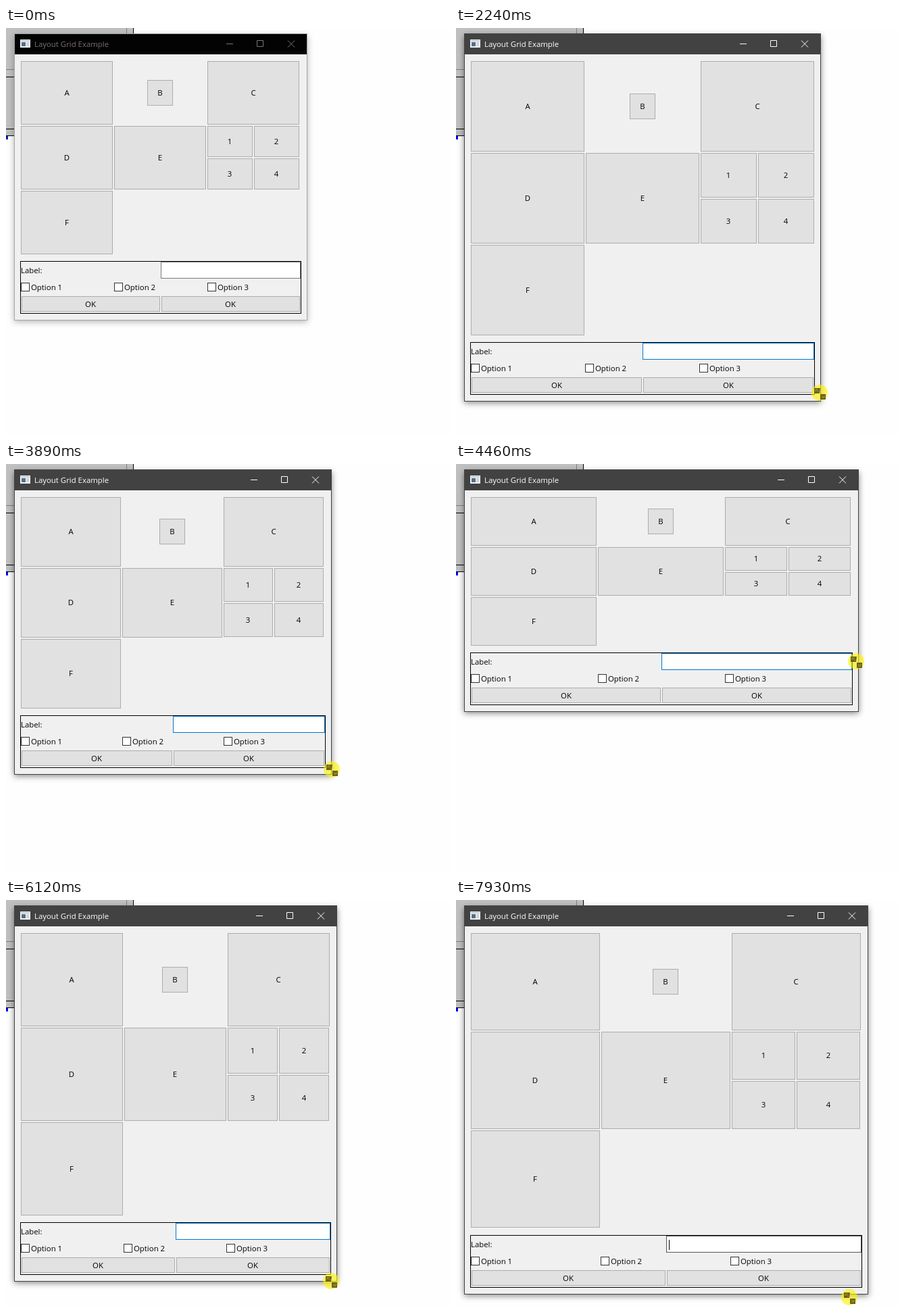
Animation, 657 px wide and 604 px high, one loop 8000 ms. Source, as an HTML page:

```html
<!DOCTYPE html>
<html lang="en">
<head>
<meta charset="utf-8">
<title>Layout Grid Example</title>
<style>
html, body { margin: 0; width: 100%; height: 100%; overflow: hidden; background: #fefefe; }
svg { display: block; width: 657px; height: 604px; }
rect { shape-rendering: crispEdges; }
text { font: 11.4px "Open Sans", "Noto Sans", sans-serif; fill: #000; }
</style>
</head>
<body>
<svg id="stage" viewBox="0 0 657 604">
  <defs>
    <filter id="blur" filterUnits="userSpaceOnUse" x="-40" y="-40" width="760" height="720">
      <feGaussianBlur stdDeviation="5"/>
    </filter>
  </defs>
</svg>
<script>
const NS = 'http://www.w3.org/2000/svg';
const LOOP = 8000, STEP = 70, ACTIVE = 1200;
const stage = document.getElementById('stage');

// Bursts of movement: start time and number of further steps.
const bursts = [[300, 9], [1200, 11], [2030, 11], [2860, 4], [3340, 11],
  [4180, 11], [5020, 10], [5840, 11], [6680, 11], [7510, 6]];

// Turns of the dragging pointer: time, x, y.
const path = [
  [1130, 446, 433], [1620, 605, 458], [1960, 570, 524], [2170, 540, 553],
  [2240, 538, 540], [2400, 552, 480], [2570, 605, 478], [3070, 647, 574], [3270, 647, 574],
  [3450, 625, 592], [3620, 520, 550], [3800, 480, 450], [4130, 590, 540],
  [4390, 596, 367], [4460, 592, 292], [4580, 572, 275], [4760, 525, 330], [5160, 615, 584],
  [5400, 540, 520], [5580, 510, 430], [5810, 612, 490], [6050, 490, 565], [6120, 481, 564],
  [6300, 445, 490], [6500, 470, 415], [6920, 548, 465], [7100, 556, 524], [7170, 559, 536],
  [7320, 540, 567], [7460, 490, 545], [7600, 530, 460], [7770, 645, 505],
  [7860, 610, 584], [7930, 582, 588]
];

// Flat at turning points, so no curve overshoots its nodes.
function slope(i, k) {
  const a = path[i - 1], p = path[i], b = path[i + 1];
  if (!a || !b || (p[k] - a[k]) * (b[k] - p[k]) <= 0) return 0;
  return (b[k] - a[k]) / (b[0] - a[0]);
}

function pointAt(t) {
  if (t < path[0][0]) {
    const u = Math.max(0, (t - 300) / 620);
    return [Math.round(408 + 39 * u + 130 * u * (1 - u)), Math.round(540 - 102 * u)];
  }
  let i = 0;
  while (i < path.length - 2 && t >= path[i + 1][0]) i++;
  const a = path[i], b = path[i + 1], d = b[0] - a[0];
  const u = Math.min(1, (t - a[0]) / d), v = 1 - u;
  return [1, 2].map(k => Math.round(
    a[k] * v * v * (1 + 2 * u) + b[k] * u * u * (3 - 2 * u) +
    d * u * v * (slope(i, k) * v - slope(i + 1, k) * u)));
}

function snap(t) {
  let q = 0;
  for (const [start, n] of bursts)
    if (t >= start) q = start + STEP * Math.min(n, Math.floor((t - start) / STEP));
  return q;
}

function set(el, attrs) {
  for (const k in attrs) el.setAttribute(k, attrs[k]);
}
function add(name, attrs = {}, parent = stage) {
  const el = document.createElementNS(NS, name);
  set(el, attrs);
  parent.appendChild(el);
  return el;
}
const fill = (x, y, width, height, color) => add('rect', { x, y, width, height, fill: color });
const framed = (color, stroke) => add('rect', { fill: color, stroke });
const button = () => framed('#e1e1e1', '#adadad');
// A one pixel border drawn inside the given bounds.
const place = (el, x, y, w, h) =>
  set(el, { x: x + .5, y: y + .5, width: Math.max(0, w - 1), height: Math.max(0, h - 1) });
function label(str, anchor = 'start') {
  const el = add('text', { 'text-anchor': anchor });
  el.textContent = str;
  return el;
}

// Desktop behind the window
fill(0, 0, 189, 8, '#c0c0c0');
fill(178, 0, 1, 8, '#808080');
fill(188, 0, 1, 9, '#000');
fill(0, 0, 13, 160, '#c0c0c0');
fill(0, 61, 13, 1, '#808080');
for (const y of [72, 149, 159]) fill(0, y, 13, 1, '#000');
const spot = fill(0, 160, 3, 5, '#00f');

// Window
const shadow = add('rect', { x: 12, y: 12, filter: 'url(#blur)' });
const border = fill(12, 8, 0, 0);
const bar = fill(13, 9, 0, 30);
const body = fill(13, 39, 0, 0, '#f0f0f0');
fill(21, 17, 15, 12, '#f4f4f4');
fill(22, 18, 13, 2, '#c3cbd2');
fill(23, 21, 6, 6, '#526f8c');
fill(30, 21, 4, 6, '#cfd4d8');
const title = label('Layout Grid Example');
set(title, { x: 42, y: 28 });
const controls = add('path', { fill: 'none' });

// Button grid
const cells = [...'ABCDEF1234'].map(s => ({ box: button(), text: label(s, 'middle') }));
function putCell(cell, x, y, w, h) {
  place(cell.box, x, y, w, h);
  set(cell.text, { x: x + Math.floor(w / 2), y: y + Math.floor(h / 2) + 4 });
}

// Form
const panel = framed('none', '#000');
const field = framed('#fff', '#7a7a7a');
const caret = fill(0, 0, 1, 15, '#000');
const caption = label('Label:');
const options = [1, 2, 3].map(n => ({ box: framed('#fff', '#333'), text: label('Option ' + n) }));
const oks = [0, 1].map(() => ({ box: button(), text: label('OK', 'middle') }));

// Pointer
const pointer = add('g');
add('circle', { r: 12, fill: '#fff200', 'fill-opacity': .62 }, pointer);
const arrow = add('path', {
  d: 'M0 0V16L4 12.5 6.5 18 9 17 6.5 11.5H11.5Z', fill: '#fff', stroke: '#000'
}, pointer);
const resizer = add('g', {}, pointer);
add('path', { d: 'M-8-7H1L0 1H-8ZM1 2H9V10H1Z', fill: '#696319' }, resizer);
add('path', {
  d: 'M-6-2V-5H-2M-5-4L-1-1M3 7H7V4M3 4L6 7', fill: 'none', stroke: '#a79d27'
}, resizer);

function drawFrame(R, B, active) {
  set(shadow, { width: R - 11, height: B - 9, fill: active ? 'rgba(0,0,0,.48)' : 'rgba(0,0,0,.3)' });
  set(border, { width: R - 11, height: B - 7, fill: active ? '#424242' : '#a6a6a6' });
  set(bar, { width: R - 13, fill: active ? '#424242' : '#030303' });
  set(body, { width: R - 13, height: B - 39 });
  title.style.fill = active ? '#fff' : '#7c7075';
  set(controls, {
    d: `M${R - 119} 23.5h10M${R - 73.5} 18.5h9v9h-9ZM${R - 28} 18.5l10 10m0-10l-10 10`,
    stroke: active ? '#fff' : '#777'
  });
  set(spot, { fill: active ? '#00f' : '#0022b8' });
}

function drawGrid(R, B) {
  const gap = 2;
  const w = Math.floor((R - 35) / 3), h = Math.floor((B - 150) / 3);
  const col = i => 22 + i * (w + gap), row = i => 49 + i * (h + gap);
  const spots = [[0, 0], [1, 0], [2, 0], [0, 1], [1, 1], [0, 2]];
  spots.forEach(([c, r], i) => putCell(cells[i], col(c), row(r), w, h));
  putCell(cells[1], col(1) + Math.floor((w - 38) / 2), row(0) + Math.floor((h - 38) / 2), 38, 38);
  const sw = Math.floor((w - gap) / 2), sh = Math.floor((h - gap) / 2);
  for (let i = 0; i < 4; i++)
    putCell(cells[6 + i], col(2) + (i % 2) * (sw + gap), row(1) + (i >> 1) * (sh + gap), sw, sh);
}

function drawForm(R, B, t) {
  const half = Math.floor((R - 31) / 2), third = Math.floor((R - 31) / 3);
  place(panel, 21, B - 87, R - 29, 78);
  place(field, 22 + half, B - 86, half, 25);
  const blue = t >= ACTIVE && t < 2860 || t >= 3340 && t < 6680;
  set(field, { stroke: blue ? '#0078d7' : t < ACTIVE ? '#7a7a7a' : '#555' });
  set(caret, { x: 26 + half, y: B - 80, opacity: t >= 6680 ? 1 : 0 });
  set(caption, { x: 22, y: B - 69 });
  options.forEach((o, i) => {
    const x = 22 + i * third;
    place(o.box, x, B - 55, 13, 13);
    set(o.text, { x: x + 15, y: B - 44 });
  });
  oks.forEach((o, i) => {
    const x = 22 + i * half;
    place(o.box, x + 1, B - 35, half - 2, 23);
    set(o.text, { x: x + Math.floor(half / 2), y: B - 19 });
  });
}

function draw(time) {
  const t = snap(time), active = t >= ACTIVE;
  // The window edge trails the pointer by one step.
  const [R, B] = active ? pointAt(t - STEP).map(v => v - 1) : [445, 432];
  drawFrame(R, B, active);
  drawGrid(R, B);
  drawForm(R, B, t);
  const [x, y] = pointAt(t);
  set(pointer, { transform: `translate(${x} ${y})`, opacity: t < 300 ? 0 : 1 });
  const resizing = t >= 860;
  set(arrow, { opacity: resizing ? 0 : 1 });
  set(resizer, { opacity: resizing ? 1 : 0 });
}

const begin = performance.now();
function tick() {
  draw((performance.now() - begin) % LOOP);
  requestAnimationFrame(tick);
}
draw(0);
requestAnimationFrame(tick);
</script>
</body>
</html>
```
